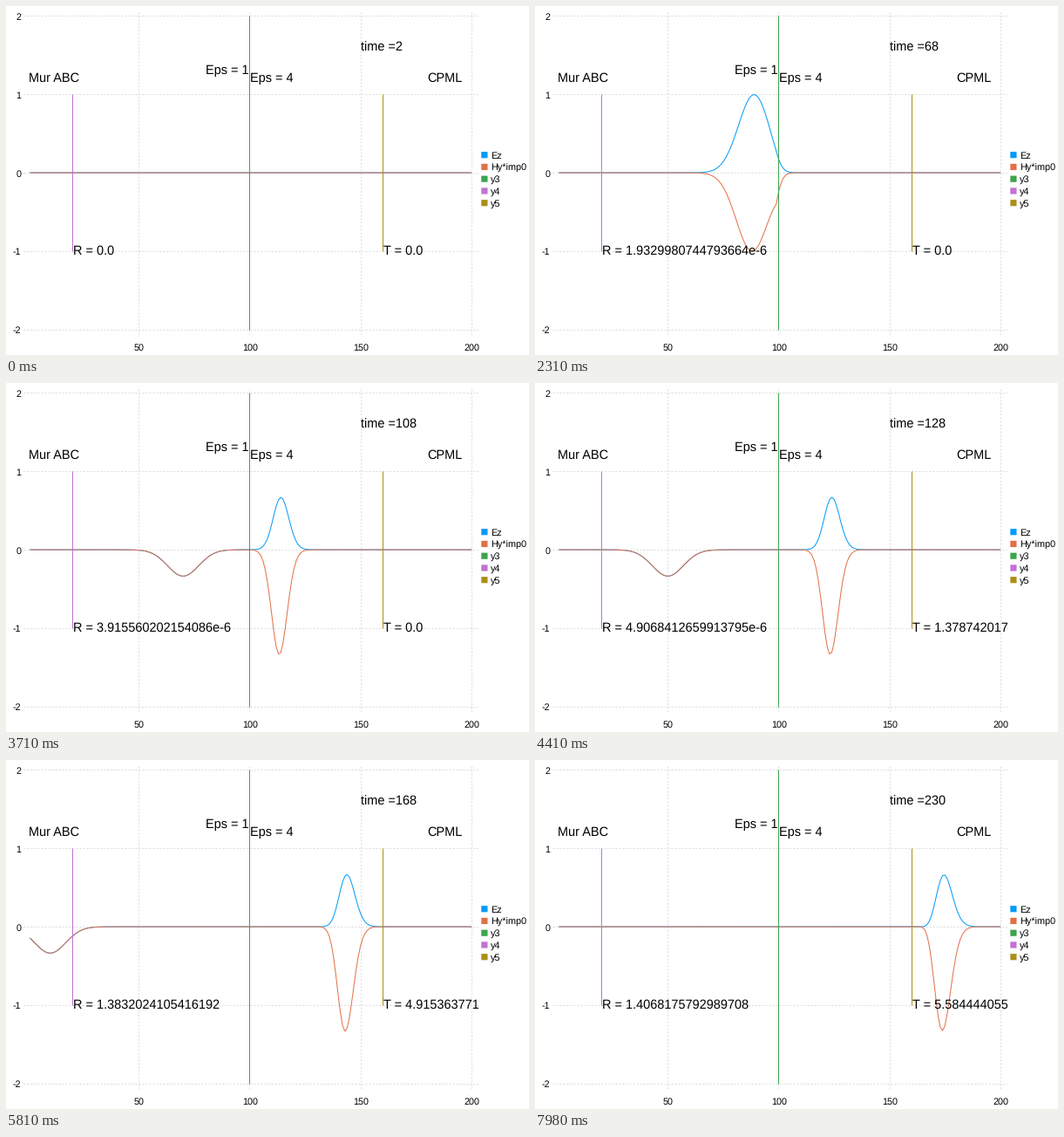
These frames come from a looping animation (600x400 px, 8000 ms). A matplotlib script:

```python
import numpy as np
import matplotlib.pyplot as plt
from matplotlib.animation import FuncAnimation
from matplotlib.patches import Rectangle

W, H, DPI = 600, 400, 100
PX = 72 / DPI                      # points per pixel
X100, DX = 279.45, 2.5415          # pixel of x = 100, pixels per cell
Y0, DY = 191.1, 89.9               # pixel of y = 0, pixels per unit
LEFT, RIGHT, TOP, BOTTOM = 20, 542, 5.7, 377.3

STEP_MS, TICK_MS, LOOP_MS = 70, 20, 8000
LAST_STEP = 230
IMP0 = 377.0
CELLS, SHOWN = 280, 200
SOURCE, SLAB, LEFT_PROBE, RIGHT_PROBE = 50, 100, 20, 160

COLORS = ["#009afa", "#e36f47", "#3da44d", "#c371d2", "#ac8e18"]
NAMES = ["Ez", "Hy*imp0", "y3", "y4", "y5"]

plt.rcParams["font.family"] = "Liberation Sans"
plt.rcParams["text.hinting"] = "none"


def pulse(t):
    return np.exp(-(t - 30) ** 2 / 100)


def simulate():
    """1D FDTD at the magic time step; returns the state after every second step."""
    ez, hy = np.zeros(CELLS + 1), np.zeros(CELLS + 1)
    eps = np.where(np.arange(CELLS + 1) >= SLAB, 4.0, 1.0)
    refl = trans = 0.0
    states = []
    for t in range(1, LAST_STEP + 1):
        hy[1:-1] += (ez[2:] - ez[1:-1]) / IMP0
        hy[SOURCE - 1] -= pulse(t) / IMP0
        edge = ez[2]
        ez[2:-1] += (hy[2:-1] - hy[1:-2]) * IMP0 / eps[2:-1]
        ez[SOURCE] += pulse(t + 1)
        ez[1] = edge               # Mur boundary
        refl += float(ez[LEFT_PROBE]) ** 2
        trans += float(ez[RIGHT_PROBE]) ** 2
        if t % 2 == 0:
            states.append((t, ez[1:SHOWN + 1].copy(), hy[1:SHOWN + 1] * IMP0, refl, trans))
    return states


def number(v):
    """Shortest float text with an unpadded exponent."""
    s = repr(float(v))
    if "e" not in s:
        return s
    mantissa, power = s.split("e")
    if "." not in mantissa:
        mantissa += ".0"
    return f"{mantissa}e{int(power)}"


def label(px, py, s, ha="left", size=10.7):
    fig.text(px / W, 1 - py / H, s, ha=ha, va="baseline", size=size * PX)


def note(x, y, s):
    return ax.text(x + 0.7 / DX, y - 4.1 / DY, s, ha="left", va="baseline",
                   size=14.5 * PX, clip_on=True, zorder=5)


states = simulate()

fig = plt.figure(figsize=(W / DPI, H / DPI), dpi=DPI, facecolor="white")
ax = fig.add_axes([LEFT / W, 1 - BOTTOM / H, (RIGHT - LEFT) / W, (BOTTOM - TOP) / H])
ax.set_xlim(100 + (LEFT - X100) / DX, 100 + (RIGHT - X100) / DX)
ax.set_ylim((Y0 - BOTTOM) / DY, (Y0 - TOP) / DY)
ax.axis("off")

grid = dict(color="#dadade", lw=PX, ls=(0, (2, 2)), zorder=0)
for x in (50, 100, 150, 200):
    ax.axvline(x, **grid)
    label(X100 + 0.4 + (x - 100) * DX, 395, str(x), "center")
for y in range(-2, 3):
    ax.axhline(y, **grid)
    label(17.3, Y0 - y * DY + 4.3, str(y), "right")

cells = np.arange(1, SHOWN + 1)
curve = dict(lw=PX, snap=False)
ez_line, = ax.plot([], [], color=COLORS[0], **curve)
hy_line, = ax.plot([], [], color=COLORS[1], **curve)
for x, h, c in zip((SLAB, LEFT_PROBE, RIGHT_PROBE), (2, 1, 1), COLORS[2:]):
    ax.plot([x, x], [-h, h], color=c, lw=PX, solid_capstyle="butt")

note(0, 1.2, "Mur ABC")
note(80, 1.3, "Eps = 1")
note(100, 1.2, "Eps = 4")
note(180, 1.2, "CPML")
time_note = note(150, 1.6, "")
r_note = note(LEFT_PROBE, -1, "")
t_note = note(RIGHT_PROBE, -1, "")

for i, (name, c) in enumerate(zip(NAMES, COLORS)):
    mid = 170.7 + 13.75 * i
    fig.add_artist(Rectangle((545.3 / W, 1 - (mid + 3.6) / H), 7.2 / W, 7.2 / H,
                             facecolor=c, edgecolor="none", snap=False))
    label(555.8, mid + 4, name, size=10.9)


def draw(i):
    k = min((i * TICK_MS + TICK_MS // 2) // STEP_MS, len(states) - 1)
    t, ez, hy, refl, trans = states[k]
    ez_line.set_data(cells, ez)
    hy_line.set_data(cells, hy)
    time_note.set_text(f"time ={t}")
    r_note.set_text(f"R = {number(refl)}")
    t_note.set_text(f"T = {number(trans)}")
    return ez_line, hy_line, time_note, r_note, t_note


anim = FuncAnimation(fig, draw, frames=LOOP_MS // TICK_MS, interval=TICK_MS,
                     repeat=True, repeat_delay=0, blit=False)
plt.show()
```
